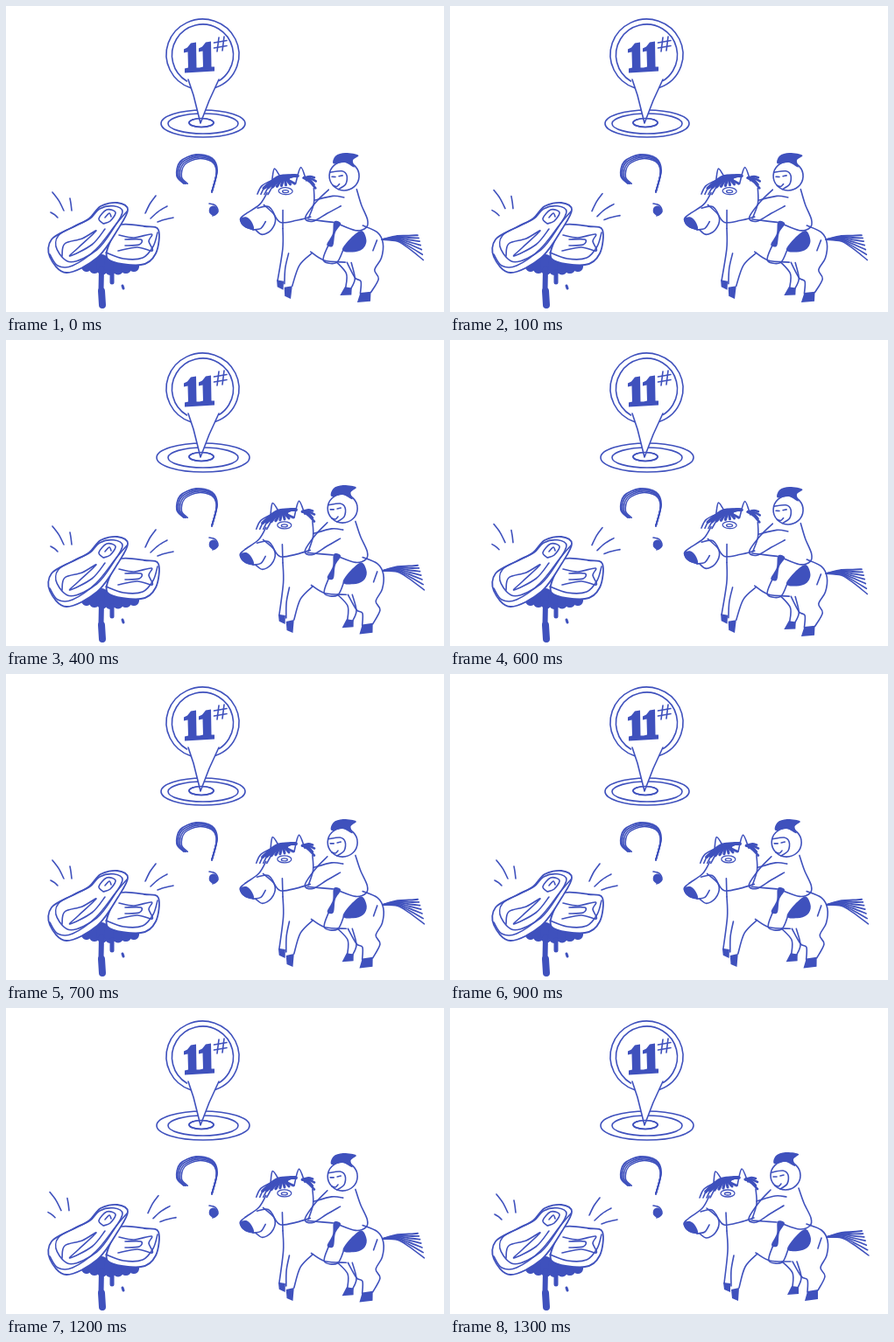
Recreate the animation shown at these times as an HTML page with a canvas. Size 500x350 px, loop 1400 ms.

```html
<!DOCTYPE html>
<html lang="en">
<head>
<meta charset="utf-8">
<title>Where to?</title>
<style>
html, body { margin: 0; width: 100%; height: 100%; overflow: hidden; background: #fff; }
canvas { display: block; width: 500px; height: 350px; }
</style>
</head>
<body>
<canvas id="stage" width="500" height="350"></canvas>
<script>
const ctx = document.getElementById('stage').getContext('2d');
const INK = '#3f51bd', PAPER = '#fff';
const STEP = 100, STEPS = 14;
const TILT = .055;

// Smooth path through a few key points
function curve(v, closed) {
  const n = v.length / 2, last = closed ? n : n - 1;
  const at = i => {
    const k = 2 * (closed ? (i + n) % n : Math.max(0, Math.min(n - 1, i)));
    return [v[k], v[k + 1]];
  };
  const path = new Path2D();
  path.moveTo(v[0], v[1]);
  for (let i = 0; i < last; i++) {
    const [a, b, c, d] = [at(i - 1), at(i), at(i + 1), at(i + 2)];
    path.bezierCurveTo(
      b[0] + (c[0] - a[0]) / 6, b[1] + (c[1] - a[1]) / 6,
      c[0] - (d[0] - b[0]) / 6, c[1] - (d[1] - b[1]) / 6, c[0], c[1]);
  }
  return path;
}

function stroke(path, width = 1.6) {
  ctx.lineWidth = width;
  ctx.stroke(path);
}

function fill(path, color = INK) {
  ctx.fillStyle = color;
  ctx.fill(path);
}

const line = (...v) => stroke(curve(v));
const thick = (width, ...v) => stroke(curve(v), width);
const blot = (...v) => fill(curve(v, true));

function arc(x, y, rx, ry = rx, from = 0, to = 360, width) {
  const path = new Path2D();
  path.ellipse(x, y, rx, ry, 0, from * Math.PI / 180, to * Math.PI / 180);
  stroke(path, width);
  return path;
}

function resized(path, x, y, sx, sy = sx, dx = 0, dy = 0) {
  const copy = new Path2D();
  copy.addPath(path, new DOMMatrix().translate(x + dx, y + dy).scale(sx, sy).translate(-x, -y));
  return copy;
}

function outlined(path) {
  fill(path, PAPER);
  stroke(path, 1.8);
}

const digit = new Path2D('M0 7L4 5 8 0 14-1 14.5 28 18 28 18 33 1 34 1 29 5 28 4.5 10 0 11Z');
const hook = curve([203, 203, 195, 194, 199, 178, 217, 170, 235, 174, 241, 188, 235, 213]);
const slab = curve([50, 287, 52, 267, 76, 253, 95, 243, 108, 229, 127, 225, 139, 233,
  128, 255, 104, 288, 69, 305], true);
const chop = curve([123, 261, 132, 250, 158, 252, 174, 256, 171, 283, 154, 296, 116, 289], true);

function drawPin(wide) {
  arc(225, 134.5, wide ? 53 : 48, wide ? 16.5 : 15.5);
  arc(225, 134.5, 40, 11.5);
  const center = arc(223, 133.5, 14, 5);
  const cone = new Path2D('M208 84L214 102 222 134 232 108 243 84');
  fill(cone, PAPER);
  stroke(center);
  stroke(cone);
  arc(224.5, 55.5, 41.5, 40.5, 109, 430);
  arc(224.5, 56, 35, 35, 121, 417);
  for (const [x, y] of [[203, 42.5], [220, 41.5]]) {
    fill(resized(digit, 0, 0, 1, 1, x, y));
  }
  for (const d of [0, 6]) {
    line(243 + d, 36 - d / 6, 241 + d, 52 - d / 6);
    line(237.5, 42 + d, 252, 39.5 + d);
  }
}

function drawQuestion() {
  for (let i = 0; i < 4; i++) {
    const s = 1 - i * .045;
    stroke(resized(hook, 222, 196, s, s, i * .6, i * .4), 1.9 - i * .15);
  }
  line(232, 226, 239, 228, 242, 235, 236, 240);
  blot(233, 230, 239, 229, 242, 236, 237, 240, 232, 236);
}

function drawSlices() {
  for (let i = 0; i < 7; i++) {
    thick(12, 91 + 9.3 * i, 290, 92 + 9 * i, 297 + 5 * Math.sin(Math.PI * (i + .5) / 7));
  }
  thick(6, 109, 300, 108.5, 325);
  thick(8, 109, 326, 110, 342);
  thick(5, 121, 304, 121, 316);
  thick(3, 133, 320, 134, 323);

  outlined(chop);
  line(114, 282, 134, 289, 156, 288, 168, 275, 173, 259);
  line(129, 262, 146, 265, 166, 261, 163, 269, 167, 280, 150, 276, 128, 280);
  stroke(curve([136, 267, 154, 267, 152, 273, 136, 274]));

  outlined(slab);
  line(50, 284, 59, 297, 76, 297, 103, 278, 126, 249, 138, 235);
  stroke(resized(slab, 95, 264, .84, .8, 1, -4));
  line(64, 286, 67, 272, 87, 266, 103, 257, 83, 276, 73, 286, 98, 273, 113, 255);
  line(111, 249, 106, 243, 115, 233, 125, 236, 119, 246, 111, 249);
  line(113, 242, 118, 237, 120, 241);
}

// Rays move away from the middle of the plate
function drawRays(out) {
  const ray = (side, x, y, dx, dy) => {
    const x0 = x + side * out, y0 = y - out * .8;
    line(x0, y0, x0 + dx * .45, y0 + dy * .55, x0 + dx, y0 + dy);
  };
  ray(-1, 66, 234, -13, -21);
  ray(-1, 75, 234, -2, -14);
  ray(-1, 59, 242, -8, -6);
  ray(1, 159, 237, 12, -20);
  ray(1, 165, 243, 19, -14);
  ray(1, 173, 247, 18, -5);
}

function drawHead() {
  line(296, 215, 288, 229, 272, 241, 267, 247, 273, 255, 283, 258);
  blot(267, 246, 274, 244, 280, 249, 283, 257, 276, 257, 269, 253);
  line(286, 233, 299, 231, 307, 244, 303, 257, 293, 263, 285, 258);
  line(282, 258, 291, 256, 296, 248);
  line(293, 229, 304, 238, 313, 248, 331, 245, 347, 240);
  line(315, 234, 316, 255);
  line(349, 207, 350, 224, 345, 241);
  line(301, 200, 303, 187, 310, 196);
  line(328, 203, 333, 184, 340, 199);
  arc(317, 212, 8, 4, 0, 360, 1.3);
  arc(317, 212.5, 3.5, 1.5, 0, 360, 1.3);
  for (let i = 0; i < 8; i++) {
    thick(3.6 - i * .1, 330 - i, 194, 309 + i * 1.5, 196 + i * .4, 292 + i * 5, 210 - i);
  }
  for (let i = 0; i < 4; i++) {
    line(285 + i * 4, 217, 290 + i * 4, 207, 304, 199);
    thick(2.6, 337, 196, 344, 194 + i * 2, 349 + i % 2 * 2, 195 + i * 4);
  }
}

function drawLegs() {
  line(316, 255, 317, 278, 313, 315);
  line(324, 283, 321, 300, 321, 318);
  line(351, 281, 337, 296, 330, 320);
  line(349, 280, 365, 289, 389, 290);
  line(407, 247, 424, 254, 431, 266, 430, 283, 423, 297, 428, 307, 420, 323);
  line(391, 290, 401, 307, 408, 311, 408, 325);
  line(379, 290, 391, 303, 391, 319);
  line(396, 290, 401, 308, 397, 320);
  line(424, 263, 420, 275);
  fill(new Path2D(`M312 314L320 315 320 325 313 322Z M321 322L330 320 329 335 322 332Z
    M390 318L398 319 398 327 385 328Z M408 324L420 322 420 333 405 335Z`));
}

function drawTail() {
  for (let i = 0; i < 7; i++) {
    const t = i / 6;
    thick(2 - t * .5, 430, 262, 447, 257 + 6 * t, 460, 256 + 14 * t,
      470 + 8 * t, 255 + 28 * t * (.6 + .4 * t));
  }
}

function drawRider() {
  arc(383, 191.5, 17, 16.5);
  line(367, 188, 380, 186, 386, 191, 385, 201, 377, 207);
  line(369, 193, 373, 193);
  line(377, 192, 381, 191);
  line(371, 203, 375, 204, 378, 201);
  blot(370, 178, 372, 169, 383, 165, 398, 167, 392, 173, 394, 181, 383, 176);
  line(366, 208, 353, 222, 341, 241, 350, 245, 366, 235, 381, 226);
  line(350, 221, 371, 215, 384, 216);
  line(398, 206, 404, 223, 412, 240, 411, 249, 399, 253, 380, 247);
  line(344, 243, 358, 244, 373, 245);
  blot(406, 253, 412, 264, 408, 274, 397, 278, 385, 276, 394, 262);
  blot(374, 244, 382, 246, 376, 257, 374, 272, 367, 271, 373, 258);
  line(369, 271, 364, 289, 379, 291, 386, 276);
}

function drawHorse(angle) {
  ctx.save();
  ctx.translate(325, 255);
  ctx.rotate(angle);
  ctx.translate(-325, -255);
  drawLegs();
  drawTail();
  drawHead();
  drawRider();
  ctx.restore();
}

function draw(n) {
  ctx.fillStyle = PAPER;
  ctx.fillRect(0, 0, 500, 350);
  ctx.strokeStyle = INK;
  ctx.lineCap = ctx.lineJoin = 'round';
  drawPin(n % 7 > 3);
  drawQuestion();
  drawSlices();
  const beat = n / 2.2 % 1;
  drawRays(beat > .25 && beat < .75 ? 3 : 0);
  drawHorse(TILT * (.5 - .5 * Math.cos(2 * Math.PI * (n - 3) / 5)));
}

const start = performance.now();
function tick() {
  draw(Math.floor((performance.now() - start) / STEP) % STEPS);
  requestAnimationFrame(tick);
}
tick();
</script>
</body>
</html>
```
